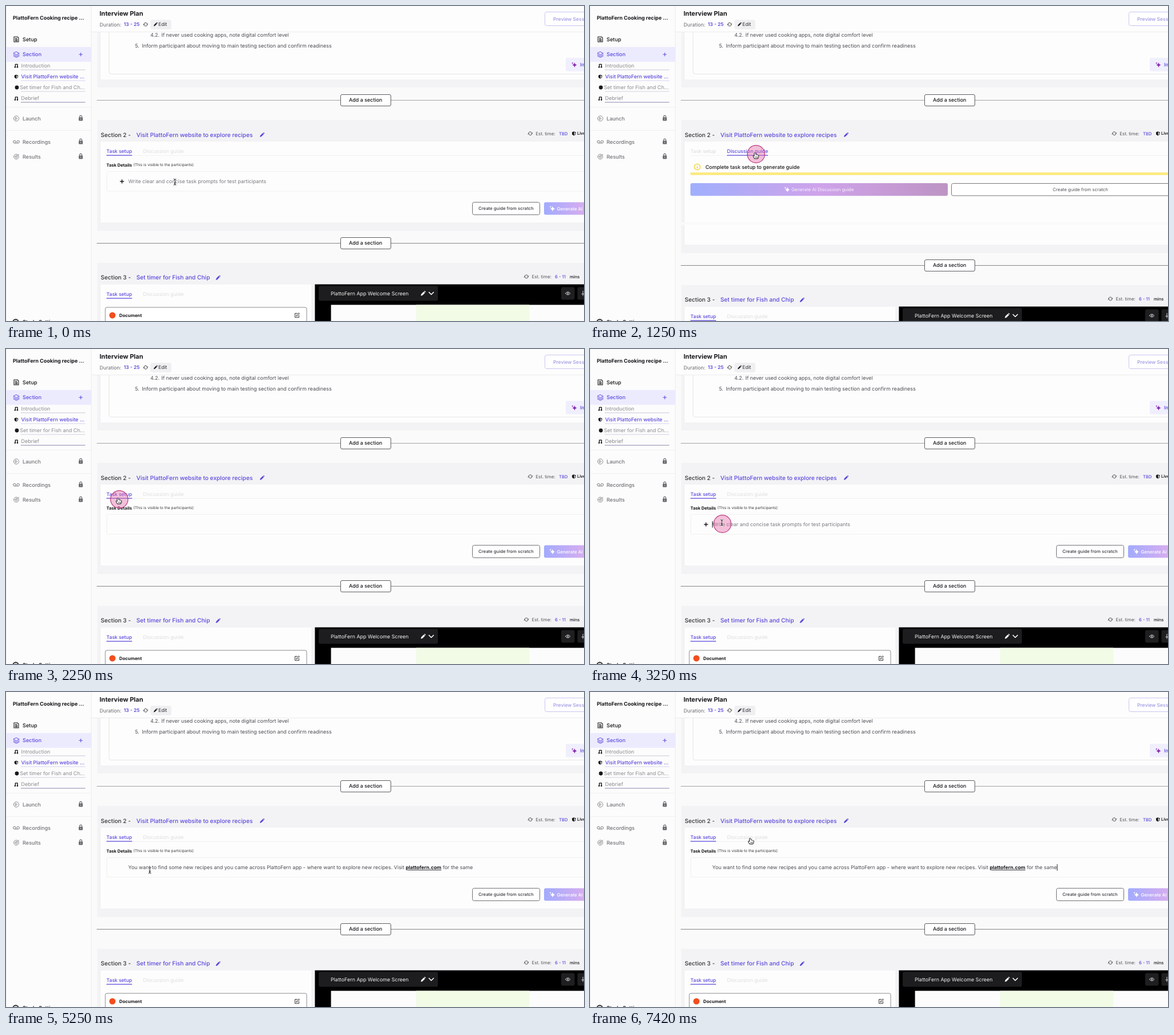
Write an HTML page that moves like this. It is 1013x553 px and loops after 8000 ms.

```html
<!DOCTYPE html>
<html lang="en">
<head>
<meta charset="utf-8">
<title>Interview plan</title>
<style>
html, body { margin: 0; width: 100%; height: 100%; overflow: hidden; background: #fbfbfb; }
svg { display: block; width: 100%; height: 100%; }
text { font-family: Inter, Roboto, sans-serif; text-rendering: geometricPrecision; white-space: pre; }
.m { font-weight: 500; }
.b { font-weight: 600; }
.h { font-weight: 700; }
.line { fill: none; stroke-linecap: round; stroke-linejoin: round; }
</style>
</head>
<body>
<svg id="stage" viewBox="0 0 1013 553" xmlns="http://www.w3.org/2000/svg"></svg>
<script>
const INK = '#18181c', BODY = '#4c4c53', GREY = '#8b8b91', PALE = '#dddde1', VIOLET = '#5a49dc';
const BRAND = 'PlattoFern';

// --- drawing helpers; y of a text is the middle of its capitals ---
const text = (x, y, size, str, fill = INK, cls = '') =>
  `<text x="${x}" y="${(y + size * 0.36).toFixed(2)}" font-size="${size}" fill="${fill}" class="${cls}">${str}</text>`;
const rect = (x, y, w, h, fill, r = 0, stroke = 'none') =>
  `<rect x="${x}" y="${y}" width="${w}" height="${h}" rx="${r}" fill="${fill}" stroke="${stroke}"/>`;
const rule = (x1, x2, y, color, w = 1) =>
  `<path d="M${x1} ${y}H${x2}" stroke="${color}" stroke-width="${w}"/>`;
const line = (x, y, d, color, w = 1) =>
  `<path transform="translate(${x} ${y})" class="line" d="${d}" stroke="${color}" stroke-width="${w}"/>`;
const solid = (x, y, d, fill, scale = 1) =>
  `<path transform="translate(${x} ${y}) scale(${scale})" d="${d}" fill="${fill}"/>`;
const dot = (x, y, r, fill) => `<circle cx="${x}" cy="${y}" r="${r}" fill="${fill}"/>`;
const group = (id, body) => `<g id="${id}">${body}</g>`;

const PENCIL = 'M-4 4l.8-2.9L1.3-3.4 3.4-1.3-1.1 3.2zM1.9-4l.5-.4q.5-.4 1 0l1 1q.5.5 0 1l-.4.5z';
const STAR = 'M0-5Q.7-.7 5 0Q.7.7 0 5Q-.7.7-5 0Q-.7-.7 0-5zM-4-5.5Q-3.8-3.8-2-3.6Q-3.8-3.3-4-1.6Q-4.2-3.3-6-3.6Q-4.2-3.8-4-5.5z';
const REFRESH = 'M-3-.4A3 3 0 0 1 2.6-1.5M3 .4A3 3 0 0 1-2.6 1.5M3.9-1.2L3 .4 1.7-.9M-3.9 1.2L-3-.4-1.7.9';
const ring = r => `M${-r} 0a${r} ${r} 0 1 0 ${2 * r} 0a${r} ${r} 0 1 0 ${-2 * r} 0`;
const HAND = 'M-1.9-5.4c-.8 0-1.2.5-1.2 1.2V.7L-4-.2c-.7-.6-1.6.1-1.2.9L-2.9 5h6c1-1.5 1.5-3.1 1.5-5 0-.9-.6-1.3-1.3-1-.2-.7-.9-.9-1.5-.6-.3-.6-1-.7-1.6-.4-.1-.2-.3-.3-.6-.3v-1.9c0-.7-.7-1.2-1.5-1.2z';
const IBEAM = 'M-2-5.2Q0-5.2 0-4V4Q0 5.2-2 5.2M2-5.2Q0-5.2 0-4M0 4Q0 5.2 2 5.2M-1.2 1.8H1.2';

const lock = y => line(131, y, 'M-2-1v-1.6a2 2 0 0 1 4 0V-1', '#65656b', 1.1)
  + rect(127.5, y - 1.6, 7, 6.2, '#65656b', 1) + rect(130.5, y + .5, 1, 2, '#fff');
const talk = y => line(18, y, 'M-1.6 2v-4.6h3.8v4.6', INK, 1.4)
  + dot(15.9, y + 2.2, 1.3, INK) + dot(20, y + 2.2, 1.3, INK);
const globe = (x, y) => solid(x, y, 'M-3.6-2.6L0-4 3.6-2.6V1.2Q3 3 0 4-3 3-3.6 1.2z', INK, .9)
  + line(x, y, 'M1-2.2V2.4M1 .3H3', '#fff', 1);

function sidebar() {
  const item = (y, str, color, under, x = 26.5, size = 9, cls = '') =>
    text(x, y, size, str, color, cls) + rule(26, 139, y + 7, under);
  return rect(0, 0, 149.5, 553, '#fcfcfc') + `<path d="M149.5 0V553M.5 0V553" stroke="#ededf0"/>`
    + text(12, 20.5, 9, BRAND + ' Cooking recipe ...', INK, 'h')
    + line(18, 58.5, 'M-4-4.5H2L4-2.5V4.5H-4zM-1.8-1.6H1M-1.8.6H2M-1.8 2.6H2', INK, 1.1)
    + text(29, 58.5, 9.2, 'Setup', INK, 'm')
    + rect(0, 72, 149, 26, '#ecebfe')
    + line(18.2, 85, 'M0-4.6L5-2 0 .6-5-2zM-5 .5L0 3.1 5 .5M-5 2.7L0 5.3 5 2.7', VIOLET, 1)
    + text(29, 85, 9.2, 'Section', VIOLET, 'm')
    + line(131, 85, 'M-2.8 0H2.8M0-2.8V2.8', VIOLET, 1.1)
    + talk(105) + item(105, 'Introduction', GREY, '#c9c8dc')
    + globe(18, 124) + item(124, `Visit ${BRAND} website ...`, VIOLET, '#d5d3ee', 26.5, 8.95, 'm')
    + dot(19, 143, 3.4, INK) + item(143, 'Set timer for Fish and Ch...', GREY, '#d0cfe0', 24.5, 9)
    + talk(162.5) + item(162, 'Debrief', GREY, '#8987b0')
    + rule(0, 149, 177.5, '#f0f0f2') + rule(0, 149, 218.5, '#f0f0f2')
    + line(18, 197.5, ring(4.6) + 'M-1.3-2L2 0-1.3 2z', GREY, 1)
    + text(29, 197.3, 9.15, 'Launch', '#727278', 'm') + lock(197)
    + line(18, 238.5, 'M-3.2 2.2a2.2 2.2 0 1 1 .1 0H3.2a2.2 2.2 0 1 1 .1 0', GREY, 1.1)
    + text(29, 238.3, 9.15, 'Recordings', '#727278', 'm') + lock(238)
    + line(18, 264.5, ring(4.4) + ring(2) + 'M0 0L4.5-4.5', GREY, 1)
    + text(29, 264.3, 9.15, 'Results', '#727278', 'm') + lock(264)
    + line(17, 555, ring(4.8) + ring(1.6), INK, 1.8)
    + text(29, 555, 9.2, 'Study Settings', INK, 'b');
}

function header() {
  return rect(150, 0, 863, 45, '#fdfdfd') + rule(150, 1013, 45.5, '#ececef')
    + text(164, 13, 11, 'Interview Plan', INK, 'h')
    + text(164, 32.3, 8.9, 'Duration:', '#6a6a70') + text(206.5, 32.3, 8.5, '13 - 25', VIOLET, 'b')
    + line(244.7, 32.3, REFRESH, '#333', .9)
    + rect(253, 24, 37, 17, '#f0f0f2', 4) + solid(262, 32.3, PENCIL, INK, .8)
    + text(267, 32.3, 8.6, 'Edit', '#333338')
    + rect(944.5, 10.5, 100, 24, '#fff', 3, '#c9c5ef') + text(959, 22.5, 8.5, 'Preview Session', '#9d97e2', 'm');
}

function introCard() {
  return rect(160, 40, 860, 103, '#f3f3f5') + rect(166, 40, 860, 89, '#fdfdfd')
    + rect(180.5, 30, 860, 89.5, '#fdfdfd', 4, '#e6e6ea')
    + text(253, 51, 8.9, '4.2.', BODY) + text(272.3, 51, 8.92, 'If never used cooking apps, note digital comfort level', BODY)
    + text(226, 69.5, 9, '5.', BODY)
    + text(238.3, 69.5, 9, 'Inform participant about moving to main testing section and confirm readiness', BODY)
    + rect(981, 91, 60, 23.5, '#f0effe', 3) + solid(996.5, 103.5, STAR, '#8a2cb4', .9)
    + text(1006, 103, 8.6, 'Improve', VIOLET, 'm');
}

const addSection = (y, color) => rule(159, 1013, y, color)
  + rect(586.5, y - 10, 88, 20, '#fff', 2.5, '#5c5c61') + text(601, y - .3, 8.95, 'Add a section', INK, 'm');

const heading = (y, n, title, pencilX) => text(166, y, 10.1, `Section ${n} -`, '#333338', 'm')
  + text(228.5, y, 10.18, title, VIOLET, 'm') + solid(pencilX, y + .3, PENCIL, VIOLET, .95);

function tabs(y, active) {
  const [a, b] = active ? [PALE, VIOLET] : [VIOLET, PALE];
  const [x1, x2] = active ? [240, 312] : [176, 221];
  return text(176, y, 8.65, 'Task setup', a, 'm') + text(240, y, 8.85, 'Discussion guide', b, active ? 'm' : '')
    + rule(x1, x2, y + 7.7, VIOLET, 1.2);
}

function taskCard() {
  return rule(176, 1013, 262.5, '#f1f1f3') + tabs(254.5, 0)
    + text(176, 279, 7.55, 'Task Details', INK, 'h')
    + text(223.3, 279, 6.65, '(This is visible to the participants)', '#3a3a40')
    + rect(176.5, 290.5, 860, 34.5, '#fdfdfd', 2, '#f0f0f2')
    + group('hint', line(203.3, 308, 'M-3 0H3M0-3V3', INK, 1.4)
      + text(214.3, 308, 8.95, 'Write clear and concise task prompts for test participants', '#7a7a80'))
    + group('typed', text(214.3, 308, 8.94, `You want to find some new recipes and you came across ${BRAND} app - where want to explore new recipes. Visit `
      + `<tspan font-weight="700" text-decoration="underline" fill="${INK}" font-size="8.6">${BRAND.toLowerCase()}.com</tspan> for the same`, BODY))
    + `<path id="caret" d="M0 302.3V313.7" stroke="#222"/>`
    + rect(817.5, 344.5, 118, 22, '#fff', 3, '#717177') + text(828, 355.7, 7.76, 'Create guide from scratch', '#3c3c42', 'm')
    + rect(943, 344.5, 148, 22, 'url(#short)', 3) + solid(958, 356, STAR, '#fff', .95)
    + text(965.5, 355.7, 8, 'Generate AI Discussion guide', '#fff', 'm');
}

function guideCard() {
  return rule(176, 1013, 262.5, '#f1f1f3') + tabs(254.5, 1)
    + rect(176, 268, 860, 28, '#fdfdfd', 2) + rect(176, 292.3, 860, 4.4, '#fbea7c', 1)
    + line(188, 282.5, ring(5.2), '#f0d32e', 1.3) + line(188, 282.5, 'M0-2.3v.1M0-.2V2.4', '#e5c51c', 1.3)
    + text(202.3, 282.5, 8.93, 'Complete task setup to generate guide', INK, 'm')
    + rect(176, 311, 451, 22.3, 'url(#long)', 3) + solid(346, 322.5, STAR, '#fff', .95)
    + text(353, 322.5, 7.85, 'Generate AI Discussion guide', '#f8f2fd')
    + rect(633.5, 311.5, 452, 21.5, '#fff', 3, '#77777d') + text(811, 322.5, 7.85, 'Create guide from scratch', '#55555b');
}

function lower() {
  return rect(160, 345, 860, 50, '#f3f3f5') + rect(166, 345, 860, 35, '#fdfdfd')
    + addSection(416.5, '#85858a')
    + rect(160, 451, 860, 110, '#f3f3f5')
    + heading(476.8, 3, 'Set timer for Fish and Chip', 371.5)
    + line(912, 475, REFRESH, '#444', .9) + text(921.5, 475, 7.9, 'Est. time:', '#55555b')
    + text(962, 475, 7.7, '6 - 11', VIOLET, 'm') + text(988, 475, 7.6, 'mins', INK, 'm')
    + rect(166, 489, 369, 70, '#fdfdfd') + tabs(505.5, 0)
    + rect(174, 529, 353, 40, '#fff', 3, '#8a8a90')
    + dot(186.5, 543, 5.5, '#f24e1e')
    + text(198.5, 543, 7.85, 'Document', INK, 'h')
    + line(510, 543, 'M0-3.5H-3.5V3.8H3.4V.5M-1 1.2L-.7-.6 3-4.3 4.4-2.9.8.8z', '#333', 1)
    + rect(541.4, 488.6, 480, 70, '#000') + rect(548, 491.5, 209, 26, '#1d1d1f', 3)
    + text(569, 504.5, 8.95, BRAND + ' App Welcome Screen', '#f2f2f2')
    + solid(731, 504.7, PENCIL, '#fff') + line(745.3, 504.5, 'M-4-2L0 2 4-2', '#fff', 1.6)
    + rect(973, 493.5, 23.5, 22, '#1f1f21', 3)
    + line(984.7, 504.5, 'M-4.2 0Q0-5.4 4.2 0Q0 5.4-4.2 0z' + ring(1.2), '#d8d8da', 1)
    + rect(1001.5, 493.5, 23.5, 22, '#1f1f21', 3) + line(1011, 504.5, 'M0-4V4M-2 1H2', '#d8d8da', 1)
    + rect(569.6, 524.6, 450, 40, '#fcfcfc') + rect(719, 524.6, 198, 40, '#f1fbe5');
}

const gradient = (id, stops) => `<linearGradient id="${id}">`
  + stops.map((c, i) => `<stop offset="${i / (stops.length - 1)}" stop-color="${c}"/>`).join('') + '</linearGradient>';

document.getElementById('stage').innerHTML =
  `<defs>${gradient('short', ['#a2abfd', '#d9adef', '#c49bd0'])}${gradient('long', ['#a0affd', '#cfa3ea', '#bd94c4'])}</defs>`
  + rect(0, 0, 1013, 553, '#fafafa') + introCard() + addSection(165.5, '#a3a3a8')
  + rect(160, 200, 860, 180, '#f3f3f5') + rect(166, 238, 860, 142, '#fdfdfd')
  + heading(226, 2, `Visit ${BRAND} website to explore recipes`, 448.7)
  + line(918.8, 223.8, REFRESH, '#444', .9) + text(928.3, 223.8, 7.9, 'Est. time:', '#55555b')
  + text(969, 223.8, 7.6, 'TBD', VIOLET, 'm') + globe(995.3, 223.8) + text(1001, 223.8, 7.4, 'Live', INK, 'b')
  + group('low', lower()) + group('task', taskCard()) + group('guide', guideCard())
  + header() + sidebar()
  + `<circle id="tap" r="15.3" fill="#e56aa6" fill-opacity=".42" stroke="#b93a7c" stroke-width="1.2"/>`
  + group('pointer', group('hand', `<path d="${HAND}" fill="#fff" stroke="#111" stroke-width="1" stroke-linejoin="round"/>`
      + line(0, 0, 'M-.9 1.3V3.4M.9 1.3V3.4M2.6 1.3V3.4', '#111', .6))
    + group('beam', line(0, 0, IBEAM, '#fff', 2.2) + line(0, 0, IBEAM, '#111', 1)));

// --- motion ---
const LOOP = 8000, FPS = 12;
const PATH = [ // time, x, y
  [0, 296, 309], [830, 291, 263], [1580, 291, 263], [2080, 198, 267], [2420, 198, 267],
  [2750, 188, 285], [2840, 188, 285], [3170, 231, 305], [3420, 231, 305], [3580, 236, 308],
  [3670, 236, 308], [4080, 252, 313], [5250, 252, 313], [5420, 249, 313], [5580, 248, 312],
  [5750, 248, 312], [6500, 282.5, 262], [LOOP, 282.5, 262]];
const TAPS = [[1170, 291, 260], [2170, 198.5, 264], [3170, 232, 307]];
const GUIDE = [1250, 2250], READY = 2330, FOCUS = 3250, PASTE = 3750, BLINK = 500, BLINK_ON = 420;

const $ = id => document.getElementById(id);
const show = (id, on) => $(id).setAttribute('visibility', on ? 'visible' : 'hidden');
const move = (id, x, y) => $(id).setAttribute('transform', `translate(${x} ${y})`);
const smooth = p => p * p * (3 - 2 * p);

function pointerAt(t) {
  const i = PATH.findIndex(k => k[0] > t);
  const [t0, x0, y0] = PATH[i - 1], [t1, x1, y1] = PATH[i];
  const p = smooth((t - t0) / (t1 - t0));
  return [x0 + (x1 - x0) * p, y0 + (y1 - y0) * p];
}

function render(t) {
  const guide = t >= GUIDE[0] && t < GUIDE[1];
  const pasted = t >= PASTE;
  $('task').style.display = guide ? 'none' : '';
  $('guide').style.display = guide ? '' : 'none';
  move('low', 0, guide ? 39 : 0);
  show('hint', !pasted && (t < GUIDE[0] || t >= READY));
  show('typed', pasted);

  const blink = (t - BLINK_ON + 2 * BLINK) % (2 * BLINK) < BLINK;
  show('caret', pasted ? blink : t >= FOCUS);
  move('caret', pasted ? 214.8 + $('typed').firstChild.getComputedTextLength() : 214.5, 0);

  const [x, y] = pointerAt(t);
  move('pointer', x, y);
  show('hand', y < 270);
  show('beam', y >= 270);

  const tap = TAPS.find(k => t >= k[0] && t < k[0] + 400);
  show('tap', tap);
  if (tap) {
    move('tap', tap[1], tap[2]);
    $('tap').setAttribute('opacity', Math.min(1, Math.max(0, 1 - (t - tap[0] - 180) / 160)));
  }
}

let start;
function tick(now) {
  start ??= now;
  const n = Math.floor(((now - start) % LOOP + 4) * FPS / 1000);
  render(Math.round(n * 100 / FPS) * 10 % LOOP);
  requestAnimationFrame(tick);
}
render(0);
requestAnimationFrame(tick);
</script>
</body>
</html>
```
